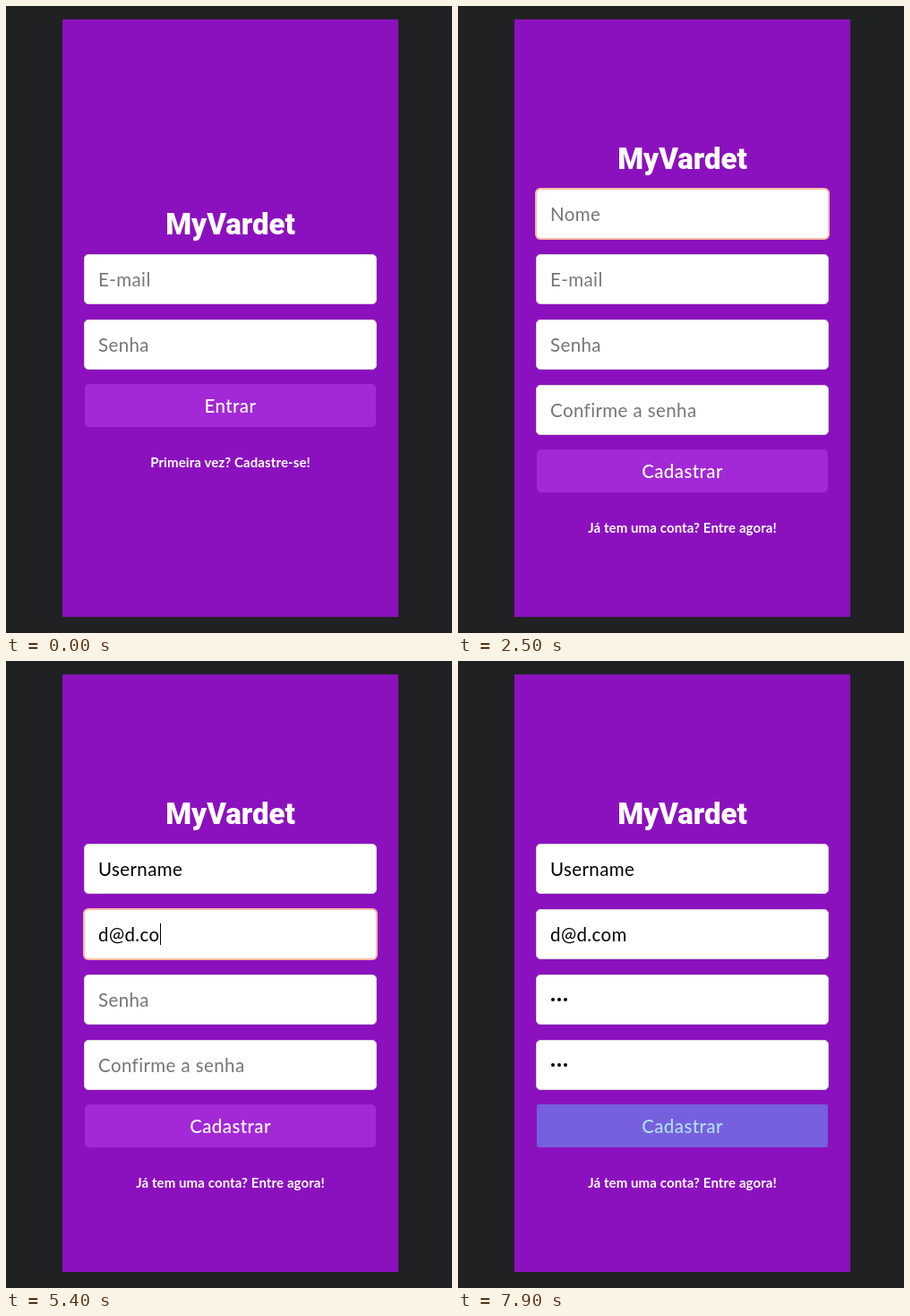
These frames come from a looping animation (498x700 px, 8000 ms). An HTML page:

```html
<!DOCTYPE html>
<html lang="pt">
<meta charset="utf-8">
<title>Cadastro</title>
<style>
  html, body { margin: 0; width: 100%; height: 100%; overflow: hidden; background: #202123; }
  body { font: 20.5px Lato, sans-serif; letter-spacing: .4px; color: #000; }
  #panel { position: absolute; left: 63px; top: 15px; width: 375px; height: 667px; background: #8c11be; }
  #form { position: absolute; left: 24px; width: 327px; }
  h1 { position: absolute; top: -53px; width: 100%; margin: 0; color: #fff; text-align: center;
       font: 900 33px/40px Roboto, sans-serif; letter-spacing: 0; }
  .field { box-sizing: border-box; height: 56px; margin-bottom: 17px; padding-left: 15px;
           border: 1px solid #d5d5d5; border-radius: 5px; background: #fff;
           display: flex; align-items: center; white-space: pre; }
  .field.focus { border-color: #f8b8a4; box-shadow: 0 0 0 1px #f8b8a4; }
  .hint { color: #757575; }
  .dot { width: 4px; height: 4px; margin: 0 2px 0 1px; border-radius: 50%; background: #000; }
  .caret { width: 1px; height: 24px; margin-right: -1px; background: #000; }
  .button { position: relative; height: 48px; margin: -1px 1px 0; border-radius: 5px; background: #a328d6;
            color: #fff; font-weight: 500; line-height: 48px; text-align: center; }
  .link { position: relative; width: max-content; margin: 30px auto 0; color: #fff;
          font-size: 15px; font-weight: 700; line-height: 18px; letter-spacing: .1px; }
  .tap::after { content: ""; position: absolute; inset: 0; background: rgba(51, 181, 229, .4); }
</style>
<div id="panel"><div id="form"></div></div>
<script>
const LOOP = 8000, LINK_TAP = 1100, SIGN_UP = 1200, SUBMIT_TAP = 7900, BLINK = 600;
const form = document.getElementById('form');

const every100 = (start, count) => Array.from({ length: count }, (_, i) => start + i * 100);
const fields = [
  { hint: 'Nome', value: 'Username', focus: 1900, blur: 4000, keys: every100(3100, 8) },
  { hint: 'E-mail', value: 'd@d.com', focus: 4000, blur: 5600, keys: [4300, 4700, 4900, 5100, ...every100(5300, 3)] },
  { hint: 'Senha', secret: true, focus: 5600, blur: 7000, keys: every100(6700, 3) },
  { hint: 'Confirme a senha', secret: true, focus: 7000, blur: SUBMIT_TAP, keys: every100(7200, 3) },
];

function fieldHtml({ hint, value, secret, focus, blur, keys }, t) {
  const typed = keys.filter(time => time <= t).length;
  const focused = t >= focus && t < blur;
  const lastInput = typed ? keys[typed - 1] : focus;
  const caret = focused && (t - lastInput) % (2 * BLINK) < BLINK ? '<i class="caret"></i>' : '';
  const text = secret ? '<i class="dot"></i>'.repeat(typed) : `<span>${(value || '').slice(0, typed)}</span>`;
  const content = typed ? text + caret : `${caret}<span class="hint">${hint}</span>`;
  return `<div class="field ${focused ? 'focus' : ''}">${content}</div>`;
}

function formHtml(t) {
  const signUp = t >= SIGN_UP;
  const shown = signUp ? fields : fields.slice(1, 3);
  const button = signUp ? 'Cadastrar' : 'Entrar';
  const link = signUp ? 'Já tem uma conta? Entre agora!' : 'Primeira vez? Cadastre-se!';
  const tapClass = on => on ? 'tap' : '';
  return `<h1>MyVardet</h1>${shown.map(field => fieldHtml(field, t)).join('')}
    <div class="button ${tapClass(t >= SUBMIT_TAP)}">${button}</div>
    <div class="link ${tapClass(t >= LINK_TAP && !signUp)}">${link}</div>`;
}

let current = '';
function render() {
  const t = performance.now() % LOOP;
  const html = formHtml(t);
  if (html !== current) {
    form.innerHTML = current = html;
    form.style.top = (t >= SIGN_UP ? 189 : 262) + 'px';
  }
  requestAnimationFrame(render);
}
render();
</script>
</html>
```
